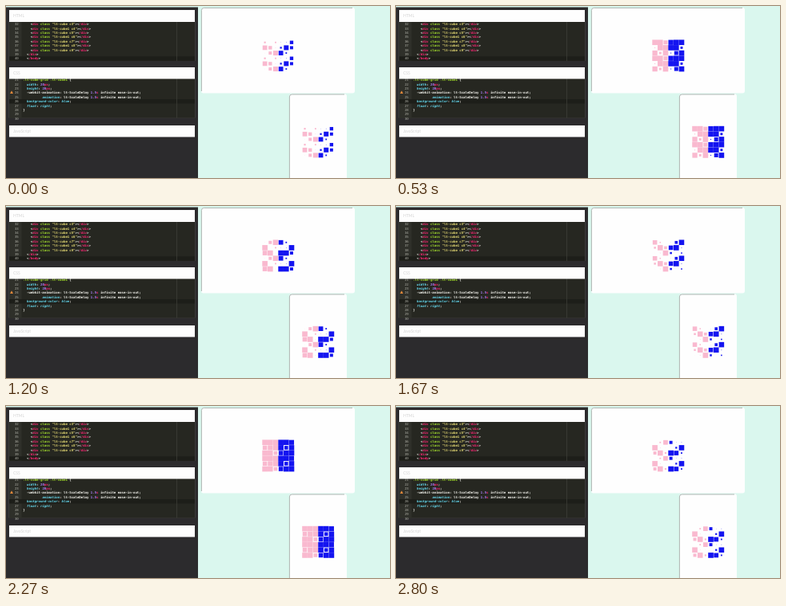
An HTML page that plays this animation: 480 by 216 pixels, repeating every 2870 ms.

```html
<!DOCTYPE html>
<html lang="en">
<meta charset="utf-8">
<title>Cube grid loader</title>
<style>
html, body { margin: 0; width: 100%; height: 100%; overflow: hidden; background: #2c2b2d }
svg { display: block }
text { white-space: pre }
.code { font: bold 4.02px "DejaVu Sans Mono", "Liberation Mono", monospace; fill: #f8f8f2 }
.num { font-weight: normal; fill: #b0b1a8; text-anchor: end }
.head { font: 5px Lato, "Open Sans", sans-serif; fill: #d4d4d4 }
.tag { fill: #f92672 }
.attr { fill: #a6e22e }
.str { fill: #e6db74 }
.prop { fill: #66d9ef; font-style: italic }
.val { fill: #ae81ff }
</style>
<svg id="stage" width="480" height="216" viewBox="0 0 480 216">
  <rect width="480" height="216" fill="#daf7ee"/>
  <rect y="1.5" width="240" height="215" fill="#2c2b2d"/>
  <g fill="#fefefe">
    <rect x="244" y="2" width="192" height="107.4" rx="3"/>
    <rect x="354" y="110.6" width="72" height="120" rx="3"/>
  </g>
  <g fill="none" stroke="#98a39f" stroke-width=".8">
    <path d="M244.4 107V5.4q0-3 3-3H433"/>
    <path d="M354.4 216V114q0-3 3-3H423"/>
  </g>
  <g id="editor"></g>
  <g id="cubes"></g>
</svg>
<script>
const LINE = 5.37, PERIOD = 1500, LOOP = 2870, START = 465, CELL = 20 / 3;
const get = id => document.getElementById(id);
const rect = (x, y, w, h, fill) => `<rect x="${x}" y="${y}" width="${w}" height="${h}" fill="${fill}"/>`;
const span = (cls, s) => `<tspan class="${cls}">${s}</tspan>`;
const text = (cls, x, y, s) => `<text class="${cls}" x="${x}" y="${y}">${s}</text>`;

const tag = s => `&lt;${span('tag', s)}&gt;`;
const cubeLine = n =>
  `  &lt;${span('tag', 'div')} ${span('attr', 'class')} ${span('str', `"lt-cube${n % 2 ? '' : '1'} c${n}"`)}&gt;${tag('/div')}`;
const rule = (name, value) => `  ${span('prop', name)}: ${value};`;
const size = span('val', '20') + span('tag', 'px');
const timing = `lt-ScaleDelay ${span('val', '1.5')}${span('tag', 's')} infinite ease-in-out`;

const html = [...[3, 4, 5, 6, 7, 8, 9].map(cubeLine), tag('/div'), tag('/body')];
const css = [
  `${span('attr', '.lt-cube-grid .lt-cube1')} {`,
  rule('width', size),
  rule('height', size),
  `  -webkit-animation: ${timing};`,
  '        ' + rule('animation', timing),
  rule('background-color', span('prop', 'blue')),
  rule('float', span('prop', 'right')),
  '}', '', ''
];

function editor(top, bottom, x, firstLine, firstY, lines, active) {
  const h = bottom - top;
  let out = rect(3.5, top, 233, h, '#4a4a48') + rect(4, top, 232, h, '#262721') + rect(4, top, 15.5, h, '#2f302a');
  lines.forEach((s, i) => {
    const y = firstY + i * LINE;
    if (i === active) out += rect(4, y - 4, 232, LINE, '#1d1e19');
    out += text('code num', 15.8, y, firstLine + i) + text('code', x, y, s);
  });
  return out + rect(213.2, top, .6, h, '#45463f');
}

const header = (y, h, label) => rect(4, y, 232, h, '#fefefe') + text('head', 9, y + h / 2 + 1.8, label);

get('editor').innerHTML =
  editor(19, 69, 26, 32, 24.3, html, 8) +
  editor(91, 140.5, 21.2, 21, 94.3, css, 5) +
  '<path d="M7 106.2l2 3.8H5z" fill="#e8893a"/>' +
  header(5, 15, 'HTML') + header(77, 14.5, 'CSS') + header(150, 14.5, 'JavaScript');

// Pink and blue cubes alternate through the nine delays, pink floating left and blue right.
function delayAt(row, col) {
  const i = row % 3 * 3;
  return 100 * (col < 3 ? (2 + 2 * (i + col)) % 9 + 1 : (1 + 2 * (i + 5 - col)) % 9 + 1);
}

// CSS ease-in-out: cubic-bezier(.42, 0, .58, 1)
function ease(x) {
  let lo = 0, hi = 1, u = .5;
  for (let i = 0; i < 16; i++) {
    u = (lo + hi) / 2;
    const bx = 1.26 * u * (1 - u) ** 2 + 1.74 * u * u * (1 - u) + u ** 3;
    if (bx < x) lo = u; else hi = u;
  }
  return u * u * (3 - 2 * u);
}

function scaleAt(t, delay) {
  const p = ((t - START - delay) / PERIOD % 1 + 1) % 1;
  if (p < .35) return 1 - ease(p / .35);
  return p < .7 ? ease((p - .35) / .35) : 1;
}

function grid(left, top, t) {
  let out = '';
  for (let r = 0; r < 6; r++) for (let c = 0; c < 6; c++) {
    const s = CELL * scaleAt(t, delayAt(r, c));
    const x = left + (c + .5) * CELL - s / 2, y = top + (r + .5) * CELL - s / 2;
    out += rect(x, y, s, s, c < 3 ? '#f9b9cf' : '#1414f0');
  }
  return out;
}

function step(t) {
  let k = Math.round(t * 3 / 200);
  if (Math.round(k * 20 / 3) * 10 > t) k--;
  return k * 200 / 3;
}

const begin = performance.now();
function draw() {
  const t = step((performance.now() - begin) % LOOP);
  get('cubes').innerHTML = grid(320.3, 42.4, t) + grid(370.2, 150.8, t);
  requestAnimationFrame(draw);
}
draw();
</script>
</html>
```
